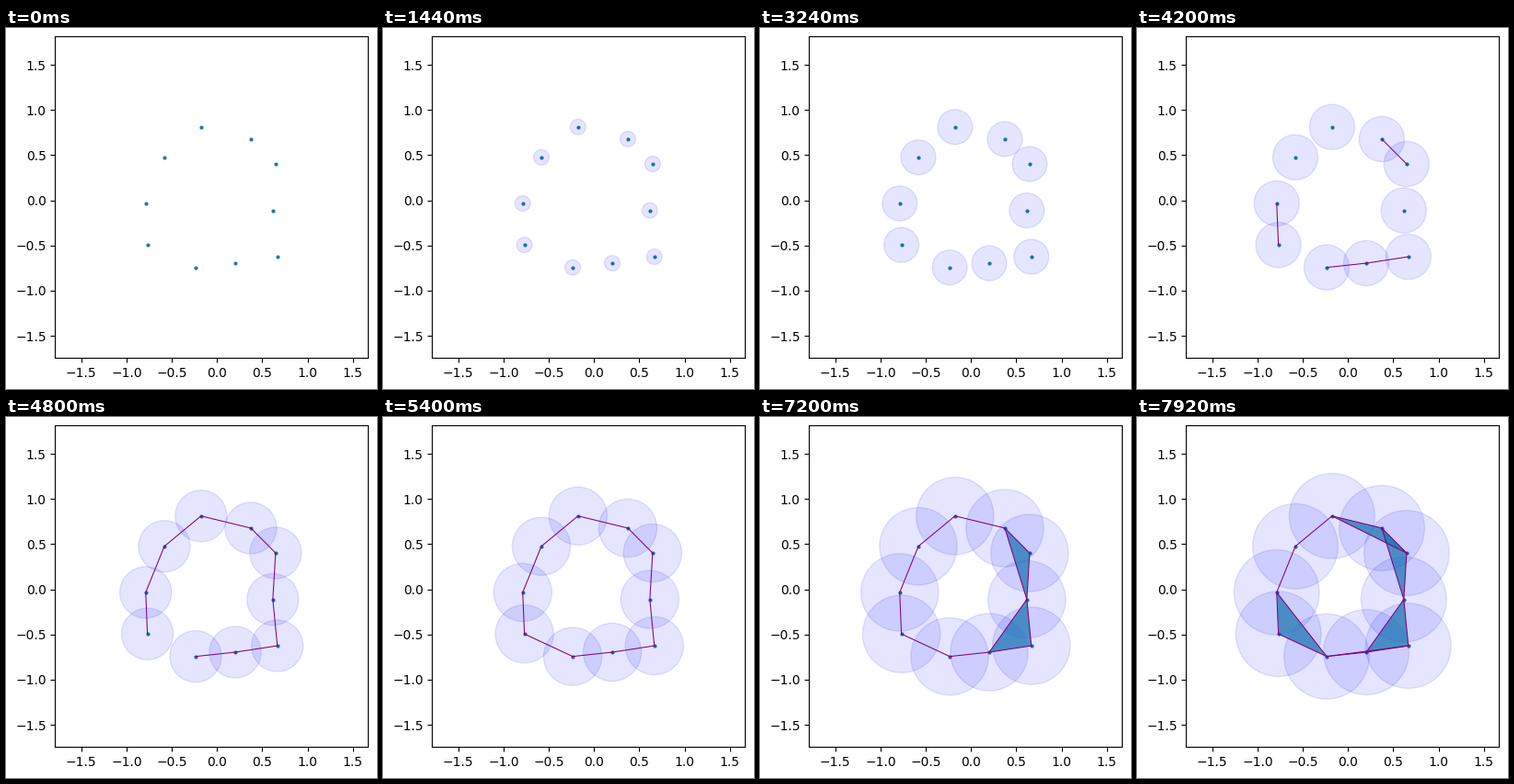
A matplotlib script for the animation above (8000 ms loop, 403 by 393 pixels).

```python
from itertools import combinations

import numpy as np
import matplotlib.pyplot as plt
from matplotlib.animation import FuncAnimation
from matplotlib.patches import Circle, Polygon

WIDTH, HEIGHT, DPI = 403, 393, 100
LOOP, INTERVAL, STEP = 8000, 40, 120
GROWTH = 0.5 / 70  # radius gained per step
MARGIN = 1         # data units around the points

# key points of the ring, clockwise from the top
points = np.array([
    (-0.177, 0.812), (0.373, 0.678), (0.647, 0.402), (0.616, -0.112),
    (0.666, -0.625), (0.201, -0.696), (-0.236, -0.743), (-0.769, -0.494),
    (-0.788, -0.034), (-0.582, 0.476),
])


def span(group):
    """Largest distance between any two points of the group."""
    return max(np.hypot(*(points[a] - points[b]))
               for a, b in combinations(group, 2))


def simplices(size):
    groups = combinations(range(len(points)), size)
    return [(points[list(g)], span(g)) for g in groups if span(g) < 1]


fig = plt.figure(figsize=(WIDTH / DPI, HEIGHT / DPI), dpi=DPI)
left, right, top, bottom = 53.4, 393.1, 9.4, 359
ax = fig.add_axes([left / WIDTH, 1 - bottom / HEIGHT,
                   (right - left) / WIDTH, (bottom - top) / HEIGHT])
low, high = points.min(axis=0) - MARGIN, points.max(axis=0) + MARGIN
ax.set_xlim(low[0], high[0])
ax.set_ylim(low[1], high[1])

ax.scatter(*points.T, s=4)
circles = [ax.add_patch(Circle(p, 0, color="b", alpha=0.1)) for p in points]
triangles = [
    (ax.add_patch(Polygon(corners, facecolor="tab:blue",
                          edgecolor="none", alpha=0.75)), size)
    for corners, size in simplices(3)
]
edges = [
    (ax.plot(*ends.T, color="purple", lw=0.75)[0], size)
    for ends, size in simplices(2)
]
links = triangles + edges


def update(frame):
    radius = frame * INTERVAL // STEP * GROWTH
    for circle in circles:
        circle.set_radius(radius)
        circle.set_visible(radius > 0)
    for artist, size in links:
        artist.set_visible(size <= 2 * radius)
    return circles + [artist for artist, _ in links]


anim = FuncAnimation(fig, update, frames=LOOP // INTERVAL, interval=INTERVAL,
                     repeat=True, repeat_delay=0, blit=True)
plt.show()
```
